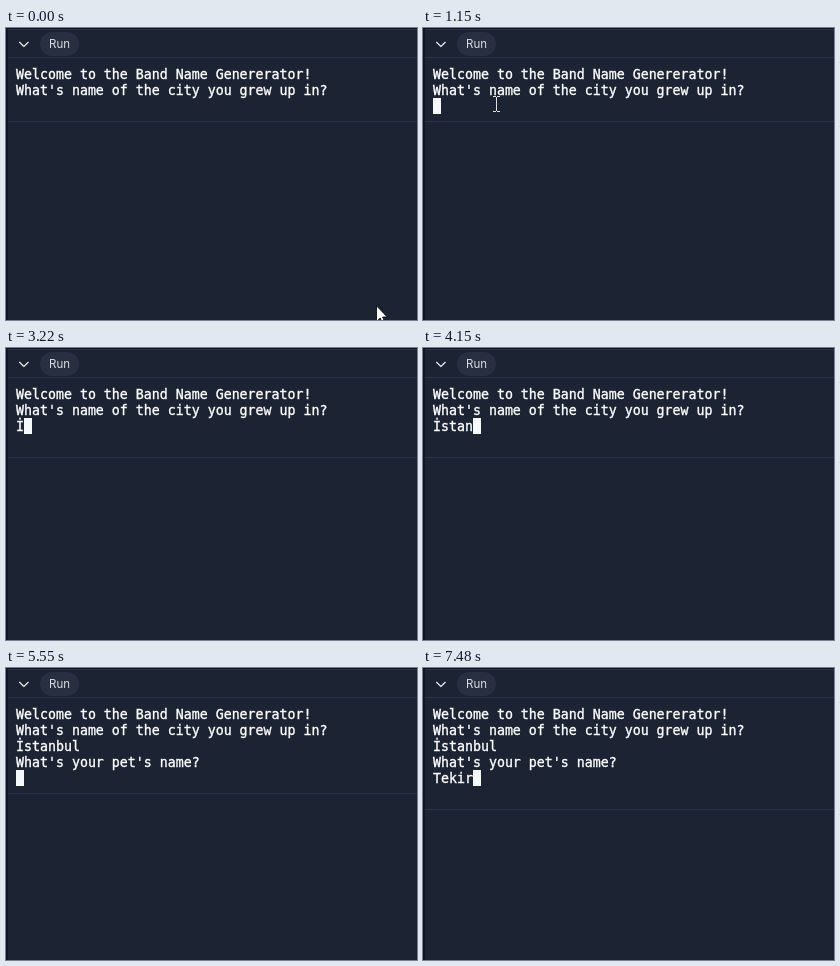
An HTML page that plays this animation: 411 px wide and 292 px high, repeating every 8000 ms.

```html
<!DOCTYPE html>
<html lang="en">
<head>
<meta charset="utf-8">
<style>
  html, body { margin: 0; width: 100%; height: 100%; overflow: hidden; background: #1c2333; }
  body { position: relative; }
  body > * { position: absolute; }
  .edge { inset: 0; border: solid #0e1525; border-width: 1px 0 0 2px; }
  .rule { left: 2px; right: 0; height: 1px; background: #2b3245; }
  .run {
    left: 34px; top: 4px; width: 39px; height: 24px; border-radius: 12px;
    background: #282f40; color: #d8dce1; text-align: center;
    font: 11.5px/24px Inter, sans-serif;
  }
  #log {
    left: 10px; top: 39px; margin: 0; color: #fff;
    font: 13.288px/16px "DejaVu Sans Mono", monospace;
    -webkit-text-stroke: .35px #fff;
  }
  #caret { width: 8px; height: 16px; background: #f5f9fc; }
  svg { left: 0; top: 0; width: 411px; height: 292px; }
</style>
</head>
<body>
<div class="edge"></div>
<div class="rule" style="top:1px"></div>
<div class="rule" style="top:29px"></div>
<div class="run">Run</div>
<pre id="log"></pre>
<div class="rule" id="bottom"></div>
<div id="caret"></div>
<svg viewBox="0 0 411 292">
  <path d="M13.3 14l4.6 4.4 4.6-4.4" fill="none" stroke="#f5f9fc" stroke-width="1.1"/>
  <g id="pointer">
    <path id="arrow" d="M.5 .8V16.5L4.2 13 6.8 18.5 9 17.5 6.6 12H11.2Z" fill="#fff" stroke="#000" stroke-width=".8"/>
    <path id="beam" d="M-3-8.5H0M1-8.5H4M.5-8V6M-3 6.5H0M1 6.5H4" fill="none" stroke="#e0e0e0" shape-rendering="crispEdges"/>
  </g>
</svg>
<script>
const LOOP = 8000, STEP = 67;
const $ = id => document.getElementById(id);
const intro = "Welcome to the Band Name Genererator!\nWhat's name of the city you grew up in?\n";
const city = { text: "İstanbul", times: [3220, 3480, 3810, 3950, 4150, 4350, 4550, 4950] };
const pet = { text: "Tekir", times: [6280, 6550, 6950, 7210, 7480] };
const ENTER = 5550, FOCUS = 1150;

const typed = (input, t) => input.text.slice(0, input.times.filter(k => k <= t).length);
const easeOut = (u, power) => 1 - (1 - u) ** power;
const mix = (a, b, u) => Math.round(a + (b - a) * u);

function pointerAt(t) {
  if (t < 880) {
    const u = Math.min(1, Math.floor(t / STEP) / 10);
    return [mix(370, 73, easeOut(u, 1.66)), mix(277, 85, easeOut(u, 3.03))];
  }
  if (t >= FOCUS && t < 1420) {
    const u = Math.min(1, Math.floor((t - FOCUS) / STEP) / 3);
    return [mix(73, 107, u), mix(77, 155, u)];
  }
  return null;
}

function draw(t) {
  const asksPet = t >= ENTER;
  const answer = typed(asksPet ? pet : city, t);
  const row = asksPet ? 4 : 2;
  const y = 38 + row * 16;
  $("log").textContent = intro + (asksPet ? city.text + "\nWhat's your pet's name?\n" : "") + answer;
  $("bottom").style.top = y + (answer ? 39 : 23) + "px";

  const caret = $("caret").style;
  caret.left = 10 + answer.length * 8 + "px";
  caret.top = y + "px";
  caret.visibility = t < FOCUS ? "hidden" : "visible";

  const pos = pointerAt(t);
  $("pointer").style.display = pos ? "" : "none";
  if (pos) {
    const overText = pos[1] < 94;
    $("pointer").setAttribute("transform", `translate(${pos})`);
    $("beam").style.display = overText ? "" : "none";
    $("arrow").style.display = overText ? "none" : "";
  }
}

const start = performance.now();
function tick() {
  draw((performance.now() - start) % LOOP);
  requestAnimationFrame(tick);
}
tick();
</script>
</body>
</html>
```
